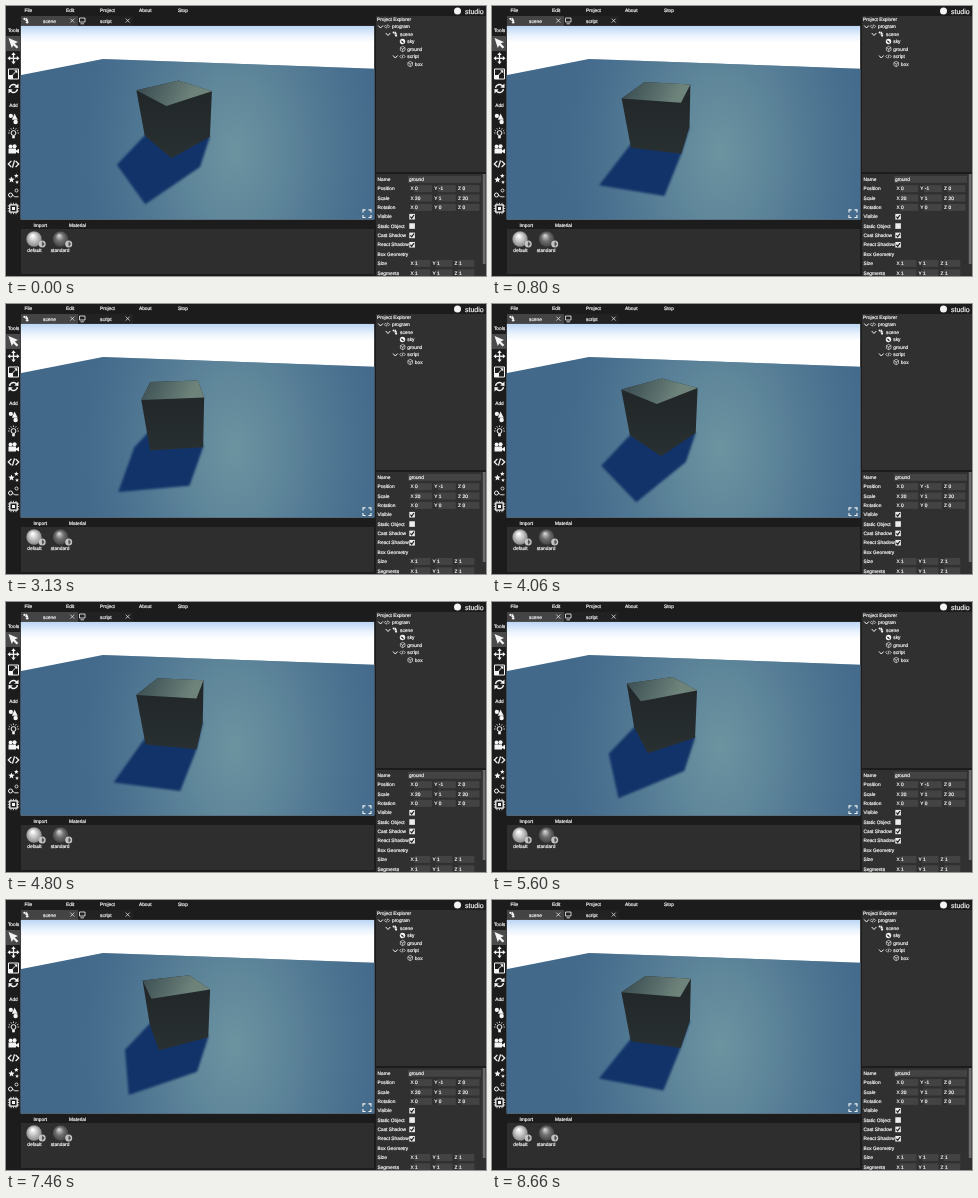
An HTML page with a canvas for the animation above (8720 ms loop, 480 by 270 pixels).

```html
<!DOCTYPE html>
<html lang="en">
<head>
<meta charset="utf-8">
<title>Scene editor</title>
<style>
html, body { margin: 0; width: 100%; height: 100%; overflow: hidden; background: #1c1c1c; }
canvas { display: block; width: 480px; height: 270px; }
</style>
</head>
<body>
<canvas id="stage" width="480" height="270"></canvas>
<script>
const ctx = document.getElementById('stage').getContext('2d');
const LOOP = 8720;
const WHITE = '#f4f4f4';
const BAR = '#1c1c1c';
const PANEL = '#303030';
const FIELD = '#434343';
const FONT = '"Liberation Sans", Arial, sans-serif';
ctx.textRendering = 'geometricPrecision';

// ---- drawing helpers ----
function rect(x, y, w, h, color) {
  ctx.fillStyle = color;
  ctx.fillRect(x, y, w, h);
}
function trace(points, closed = true) {
  ctx.beginPath();
  points.forEach(([x, y], i) => i ? ctx.lineTo(x, y) : ctx.moveTo(x, y));
  if (closed) ctx.closePath();
}
function poly(points, color) {
  trace(points);
  ctx.fillStyle = color;
  ctx.fill();
}
function line(points, color = WHITE, width = 1, closed = false) {
  trace(points, closed);
  ctx.strokeStyle = color;
  ctx.lineWidth = width;
  ctx.stroke();
}
function disc(x, y, r, color = WHITE) {
  ctx.beginPath();
  ctx.arc(x, y, r, 0, 7);
  ctx.fillStyle = color;
  ctx.fill();
}
function arc(x, y, r, from = 0, to = 2 * Math.PI, width = 1) {
  ctx.beginPath();
  ctx.arc(x, y, r, from, to);
  ctx.strokeStyle = WHITE;
  ctx.lineWidth = width;
  ctx.stroke();
}
function text(str, x, y, size = 4.8, align = 'left') {
  ctx.font = `${size}px ${FONT}`;
  ctx.textAlign = align;
  ctx.textBaseline = 'alphabetic';
  ctx.fillStyle = ctx.strokeStyle = WHITE;
  ctx.lineWidth = 0.2;
  ctx.fillText(str, x, y + size * 0.36);
  ctx.strokeText(str, x, y + size * 0.36);
}
function fade(gradient, ...stops) {
  stops.forEach(([at, color]) => gradient.addColorStop(at, color));
  return gradient;
}
function cross(x, y, r) {
  line([[x - r, y - r], [x + r, y + r]], WHITE, 0.7);
  line([[x + r, y - r], [x - r, y + r]], WHITE, 0.7);
}
function chevron(x, y) {
  line([[x - 2.3, y - 1.2], [x, y + 1.3], [x + 2.3, y - 1.2]], WHITE, 1);
}

// ---- icons ----
function codeIcon(x, y, s) {
  line([[x - s * 0.4, y - s * 0.6], [x - s, y], [x - s * 0.4, y + s * 0.6]], WHITE, s * 0.25);
  line([[x + s * 0.4, y - s * 0.6], [x + s, y], [x + s * 0.4, y + s * 0.6]], WHITE, s * 0.25);
  line([[x + s * 0.2, y - s * 0.7], [x - s * 0.2, y + s * 0.7]], WHITE, s * 0.25);
}
function boxIcon(x, y, s) {
  const hex = [0, 1, 2, 3, 4, 5].map(i => {
    const a = (i + 0.5) * Math.PI / 3;
    return [x + s * Math.cos(a), y + s * Math.sin(a)];
  });
  line(hex, WHITE, 0.6, true);
  line([hex[3], [x, y], hex[5]], WHITE, 0.6);
  line([[x, y], hex[1]], WHITE, 0.6);
}
function sceneIcon(x, y, s) {
  disc(x - s * 0.5, y - s * 0.55, s * 0.4);
  poly([[x + s * 0.2, y - s], [x + s * 0.8, y + s * 0.2], [x - s * 0.3, y + s * 0.2]], WHITE);
  disc(x + s * 0.4, y + s * 0.6, s * 0.42);
}
function star(x, y, r) {
  const points = [...Array(10).keys()].map(i => {
    const a = i * Math.PI / 5 - Math.PI / 2;
    const d = i % 2 ? r * 0.45 : r;
    return [x + d * Math.cos(a), y + d * Math.sin(a)];
  });
  poly(points, WHITE);
}
function moveIcon(x, y) {
  for (let i = 0; i < 4; i++) {
    ctx.save();
    ctx.translate(x, y);
    ctx.rotate(i * Math.PI / 2);
    line([[0, 0], [0, -4]], WHITE, 1.3);
    poly([[0, -6], [2.2, -3.3], [-2.2, -3.3]], WHITE);
    ctx.restore();
  }
}
function rotateIcon(x, y) {
  arc(x, y, 4, Math.PI * 1.05, Math.PI * 1.8, 1.5);
  arc(x, y, 4, Math.PI * 0.05, Math.PI * 0.8, 1.5);
  poly([[x + 5, y - 5], [x + 5, y - 0.5], [x + 0.8, y - 1]], WHITE);
  poly([[x - 5, y + 5], [x - 5, y + 0.5], [x - 0.8, y + 1]], WHITE);
}
function toolbar() {
  rect(0, 30, 14, 15, '#4a4a4a');
  text('Tools', 7.5, 24, 4.8, 'center');
  poly([[2.5, 32], [12, 36], [8.8, 37.6], [12.3, 41], [10.6, 42.6], [7.3, 39.2], [5.8, 42]], WHITE);
  moveIcon(7.5, 52.3);
  line([[2.5, 63], [12.5, 63], [12.5, 73], [2.5, 73]], WHITE, 1, true);
  rect(2.5, 69, 4.5, 4, WHITE);
  line([[6.5, 69], [10.5, 65]], WHITE, 1);
  poly([[11.3, 64.2], [11.3, 67.4], [8.1, 64.2]], WHITE);
  rotateIcon(7.5, 82.5);
  text('Add', 7.5, 99, 4.8, 'center');
  sceneIcon(7.5, 112.8, 5.3);
  arc(7.5, 127, 2.4, 0, 7, 1);
  rect(6.2, 129.5, 2.6, 2.8, WHITE);
  for (let i = 0; i < 7; i++) {
    const a = Math.PI * (1 + i / 6), c = Math.cos(a), s = Math.sin(a);
    line([[7.5 + 4 * c, 127 + 4 * s], [7.5 + 5.5 * c, 127 + 5.5 * s]], WHITE, 0.8);
  }
  rect(2.5, 142.5, 7.5, 5, WHITE);
  poly([[10, 144.5], [13, 142.8], [13, 147.5], [10, 146]], WHITE);
  disc(4.5, 140.5, 1.9);
  disc(8.5, 140.3, 2.1);
  codeIcon(7.5, 158, 5.2);
  star(5.5, 173.8, 3.3);
  star(10.3, 169.8, 2.4);
  star(11, 176.2, 2);
  arc(4.5, 189, 2, 0, 7, 1);
  arc(10.5, 184.5, 1.5, 0, 7, 0.8);
  line([[6.5, 189], [8.7, 190.8], [12.5, 190.8]], WHITE, 0.9);
  line([[3.8, 198.8], [11.2, 198.8], [11.2, 206.2], [3.8, 206.2]], WHITE, 1.3, true);
  rect(6, 201, 3, 3, WHITE);
  for (let i = 0; i < 3; i++) {
    const d = 5 + i * 2.5;
    line([[d, 196.8], [d, 198.5]], WHITE, 0.8);
    line([[d, 206.5], [d, 208.2]], WHITE, 0.8);
    line([[1.8, 195 + d], [3.5, 195 + d]], WHITE, 0.8);
    line([[11.5, 195 + d], [13.2, 195 + d]], WHITE, 0.8);
  }
}

// ---- panels ----
function topBar() {
  const menu = { File: 18.5, Edit: 60, Project: 94, About: 133, Stop: 172 };
  for (const name in menu) text(name, menu[name], 4.7);
  disc(451.5, 5, 3.5, WHITE);
  text('studio', 459, 5, 7);
  rect(15, 10, 57, 10, '#444');
  rect(72, 10, 55, 10, '#222');
  sceneIcon(20, 14.5, 3);
  text('scene', 37, 14.8);
  cross(66.3, 14.6, 2);
  line([[73.5, 12], [79, 12], [79, 16], [73.5, 16]], WHITE, 0.8, true);
  line([[74.5, 17.8], [78, 17.8]], WHITE, 0.8);
  text('script', 94, 14.8);
  cross(121.7, 14.6, 2);
}
function ball(x, y, light, mid, dark) {
  const shade = ctx.createRadialGradient(x - 1.5, y - 3.5, 0.5, x, y, 8);
  disc(x, y, 7.7, fade(shade, [0, light], [0.5, mid], [1, dark]));
  disc(x + 8.2, y + 5, 3.5, '#c4c4c4');
  poly([[x + 8.5, y + 2.3], [x + 10.5, y + 5], [x + 8.5, y + 7.7], [x + 7.7, y + 5]], '#555');
}
function assets() {
  rect(15, 223, 353, 45, '#2e2e2e');
  text('Import', 27.5, 219.2);
  text('Material', 63, 219.2);
  ball(28, 233, '#ffffff', '#c4c4c4', '#858585');
  ball(54.5, 233, '#d0d0d0', '#6e6e6e', '#434343');
  text('default', 28.5, 244, 4.8, 'center');
  text('standard', 54, 244, 4.8, 'center');
}
function explorer() {
  rect(370, 10, 110, 156, PANEL);
  text('Project Explorer', 371, 13.2);
  chevron(374.5, 20.7);
  codeIcon(381, 20.5, 2.7);
  text('program', 386, 20.5);
  chevron(382, 28.2);
  sceneIcon(389, 28, 2.7);
  text('scene', 394, 28);
  disc(396.5, 35.5, 2.7);
  poly([[394.5, 34.5], [397, 35], [398, 37.4], [396, 36.5]], PANEL);
  text('sky', 401.3, 35.5);
  boxIcon(396.7, 43, 2.7);
  text('ground', 401.3, 43);
  chevron(389.3, 50.7);
  codeIcon(396.5, 50.5, 2.7);
  text('script', 401.3, 50.5);
  boxIcon(404.2, 58, 2.7);
  text('box', 408.8, 58);
}
function fields(y, values, gap = 23.7) {
  values.forEach((value, i) => {
    const x = 404.5 + i * gap;
    rect(x + 3.6, y - 3.5, gap - 5.7, 7, FIELD);
    text('XYZ'[i], x, y);
    text(value, x + 4.6, y);
  });
}
function checkbox(y, on) {
  rect(403.3, y - 2.8, 5.6, 5.6, '#ececec');
  if (on) line([[404.4, y], [405.7, y + 1.5], [408, y - 1.7]], '#222', 1.2);
}
function properties() {
  rect(370, 168, 110, 102, PANEL);
  rect(476.8, 168, 2.7, 90, '#6c6c6c');
  const labels = ['Name', 'Position', 'Scale', 'Rotation', 'Visible', 'Static Object',
    'Cast Shadow', 'React Shadow', 'Box Geometry', 'Size', 'Segments'];
  const rowY = i => 173.3 + i * 9.35;
  labels.forEach((label, i) => text(label, 371.5, rowY(i)));
  rect(402, 169.8, 73, 7, FIELD);
  text('ground', 403, rowY(0));
  fields(rowY(1), ['0', '-1', '0']);
  fields(rowY(2), ['20', '1', '20']);
  fields(rowY(3), ['0', '0', '0']);
  [true, false, true, true].forEach((on, i) => checkbox(rowY(4 + i), on));
  fields(rowY(9), ['1', '1', '1'], 22);
  fields(rowY(10), ['1', '1', '1'], 22);
}

// ---- 3D view ----
const VIEW = [14.6, 19.7, 353.8, 193.9];
const EYE = { height: 2.017, focal: 167, cos: 0.875, sin: 0.485, x: 191.5, y: 115.8 };
const BOX = { x: -0.44, z: 3, radius: Math.SQRT1_2, height: 1.015 };
const CAST = [-0.225, -0.895]; // ground offset of a shadow per unit of height

function project(x, z, y) {
  const drop = EYE.height - y;
  const scale = EYE.focal / (z * EYE.cos + drop * EYE.sin);
  return [EYE.x + x * scale, EYE.y + (drop * EYE.cos - z * EYE.sin) * scale];
}
function hull(points) {
  points = [...points].sort((a, b) => a[0] - b[0] || a[1] - b[1]);
  const half = list => {
    const out = [];
    for (const p of list) {
      while (out.length > 1) {
        const [a, b] = out.slice(-2);
        if ((b[0] - a[0]) * (p[1] - a[1]) - (b[1] - a[1]) * (p[0] - a[0]) > 0) break;
        out.pop();
      }
      out.push(p);
    }
    return out.slice(0, -1);
  };
  return [...half(points), ...half(points.reverse())];
}
function backdrop() {
  rect(...VIEW, fade(ctx.createLinearGradient(0, 20, 0, 37),
    [0, '#bcd6f4'], [0.6, '#ecf4fd'], [1, '#ffffff']));
  const ground = [[14, 69.3], [97, 53], [369, 62.7], [369, 214], [14, 214]];
  poly(ground, '#42688a');
  ctx.save();
  trace(ground);
  ctx.clip();
  ctx.translate(228, 145);
  ctx.scale(1, 1.6);
  const glow = ctx.createRadialGradient(0, 0, 0, 0, 0, 185);
  rect(-240, -160, 480, 320, fade(glow,
    [0, 'rgba(108,148,160,.98)'], [0.25, 'rgba(102,142,158,.82)'],
    [0.5, 'rgba(92,132,153,.58)'], [0.75, 'rgba(80,120,148,.27)'], [1, 'rgba(66,104,138,0)']));
  ctx.restore();
}
function box(degrees) {
  const corners = [0, 1, 2, 3].map(i => {
    const a = degrees * Math.PI / 180 + i * Math.PI / 2;
    return [BOX.x + BOX.radius * Math.sin(a), BOX.z - BOX.radius * Math.cos(a)];
  });
  const base = corners.map(([x, z]) => project(x, z, 0));
  const top = corners.map(([x, z]) => project(x, z, BOX.height));
  const cast = corners.map(([x, z]) => project(x + CAST[0], z + CAST[1], 0));

  ctx.filter = 'blur(1.2px)';
  poly(hull([...base, ...cast]), '#123369');
  ctx.filter = 'none';

  poly(hull([...base, ...top]),
    fade(ctx.createLinearGradient(0, 90, 0, 152), [0, '#22282a'], [1, '#293032']));
  poly(top, fade(ctx.createLinearGradient(140, 78, 182, 98),
    [0, '#405256'], [0.55, '#586d6a'], [1, '#6e837a']));
}
function expandIcon() {
  for (const sx of [-1, 1]) for (const sy of [-1, 1]) {
    const x = 361 + sx * 4, y = 207.7 + sy * 3.8;
    line([[x - sx * 2.5, y], [x, y], [x, y - sy * 2.5]], WHITE, 1.1);
  }
}
function view(degrees) {
  ctx.save();
  ctx.beginPath();
  ctx.rect(...VIEW);
  ctx.clip();
  backdrop();
  box(degrees);
  expandIcon();
  ctx.restore();
}

function draw(time) {
  // 15 steps a second, on a clock of 10 ms ticks
  const tick = Math.floor((time % LOOP) / 10);
  const step = Math.ceil(3 * (tick + 1) / 20) - 1;
  rect(0, 0, 480, 270, BAR);
  topBar();
  toolbar();
  assets();
  explorer();
  properties();
  view(step * 3.04 - 2);
}

const start = performance.now();
function loop() {
  draw(performance.now() - start);
  requestAnimationFrame(loop);
}
loop();
</script>
</body>
</html>
```
